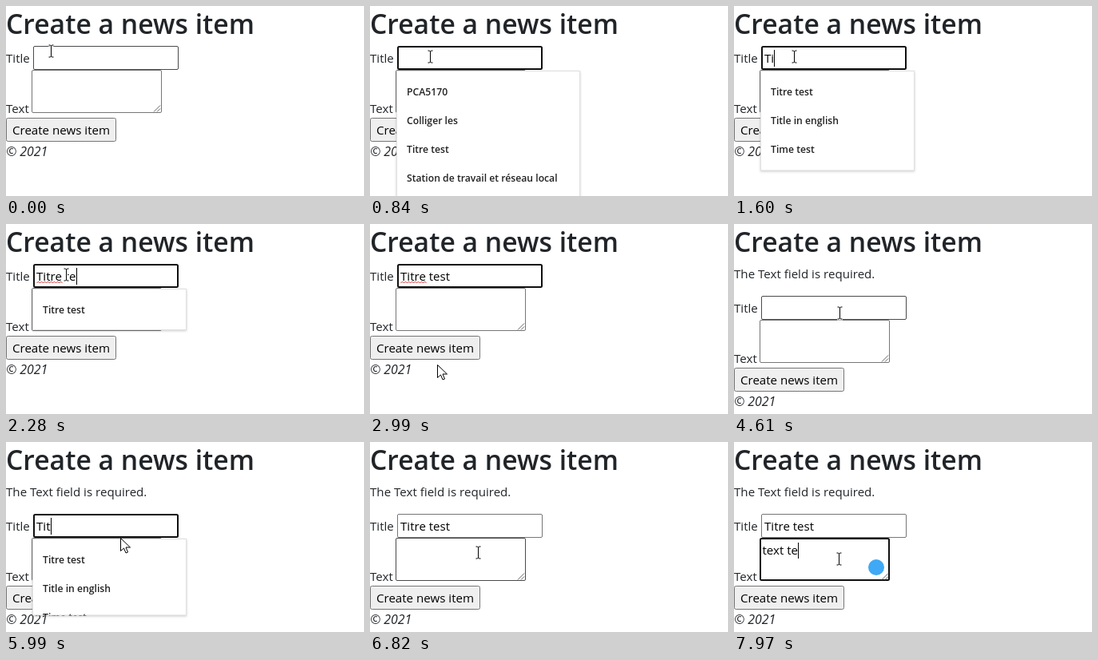
An HTML page for the animation above (8 s loop, 448 px wide and 238 px high).

```html
<!DOCTYPE html>
<html lang="en">
<head>
<meta charset="utf-8">
<title>Create a news item</title>
<style>
  html, body { margin: 0; width: 100%; height: 100%; overflow: hidden; background: #fff; }
  #stage { display: block; width: 448px; height: 238px; }
  text { font: 15.12px "Open Sans", "Noto Sans", sans-serif; fill: #212529; white-space: pre; }
  .heading { font-size: 33.7px; font-weight: 600; }
  .control { fill: #000; }
  .footer { font-size: 15.9px; font-style: italic; }
  #rows text { font-size: 12.2px; font-weight: 600; fill: #222; }
  #panel { fill: #fff; stroke: #e0e0e0; filter: drop-shadow(0 1px 1.5px rgba(0, 0, 0, .2)); }
  .box { fill: #fff; stroke: #767676; }
  .box.hover { stroke: #4a4a4a; }
  .box.focus { stroke: #101010; stroke-width: 2px; }
  #button { fill: #efefef; }
  #button.hover { fill: #e5e5e5; }
  .caret { fill: #000; }
  .line { fill: none; stroke: #000; }
  .halo { fill: none; stroke: #fff; stroke-width: 3px; }
  .shape { fill: #fff; stroke: #000; stroke-linejoin: round; }
  #grip { stroke: #606060; }
  #squiggle { stroke: #e03030; }
</style>
</head>
<body>
<svg id="stage" viewBox="0 0 448 238">
  <text class="heading" x="0" y="35">Create a news item</text>
  <text id="error" x="0" y="68">The Text field is required.</text>
  <g id="form">
    <text x="0" y="71">Title</text>
    <text x="0" y="134">Text</text>
    <rect id="area" class="box" rx="1.5"/>
    <path id="grip" class="line" d="M185 132.5L193 124.5M189 132.5L193 128.5"/>
    <text id="areaText" class="control" x="35.5" y="101"></text>
    <rect id="areaCaret" class="caret" y="86" width="1" height="20"/>
    <circle id="badge" cx="178" cy="117" r="10" fill="#3fa9f5"/>
    <rect id="button" class="box" rx="2"/>
    <text class="control" x="8" y="161">Create news item</text>
    <text class="footer" x="0" y="188">© 2021</text>
    <rect id="title" class="box" rx="1.5"/>
    <text id="titleText" class="control" x="38" y="71"></text>
    <path id="squiggle" class="line"/>
    <rect id="titleCaret" class="caret" y="55" width="1" height="21"/>
    <g id="popup">
      <rect id="panel" x="33.5" y="81.5"/>
      <svg id="rows" x="33" y="81" width="230" overflow="hidden"></svg>
    </g>
  </g>
  <g id="mouse">
    <g id="beam">
      <path class="halo" d="M-3.5 -7.5H3.5M0 -7.5V7.5M-3.5 7.5H3.5"/>
      <path class="line" d="M-3 -7.5H-1L0 -6.5L1 -7.5H3M0 -6.5V6.5M-3 7.5H-1L0 6.5L1 7.5H3"/>
    </g>
    <path id="arrow" class="shape" d="M0 0V16L4 12.5L6.5 18.5L9 17.5L6.5 11.5H12Z"/>
    <g id="hand">
      <path class="shape" d="M-2 1.5Q0 -1 2 1.5V7Q4 5.5 5.5 7.5Q7.5 6.5 8.5 8.5Q11 8 11 11V15Q11 18 9 20V22.5H-.5V20.5L-6 13.5Q-7 11 -4.5 11L-2 13Z"/>
      <path class="line" d="M2 7V11M5.5 8V11M8.5 9V11.5"/>
    </g>
  </g>
</svg>
<script>
const LOOP = 8000, SUBMIT = 3750, BLINK = 530, FADE = 70, SHRINK = 60;
const ROW = 36, PADDING = 16;
const SVG = 'http://www.w3.org/2000/svg';
const $ = id => document.getElementById(id);

const recent = ['PCA5170', 'Colliger les', 'Titre test', 'Station de travail et réseau local'];
const matches = ['Titre test', 'Title in english', 'Time test', 'Test'];

const boxes = {
  title: { x: 34, y: 50, w: 182, h: 30, cursor: 'beam' },
  area: { x: 32, y: 80, w: 163, h: 54, cursor: 'beam' },
  button: { x: 0, y: 140, w: 138, h: 30, cursor: 'hand' }
};

// Each entry starts with three slow gaps, then runs at the fast pace.
const firstTry = { word: 'Titre test', focus: 310, blur: 3350, start: 1310, slow: 243, fast: 52 };
const secondTry = { word: 'Titre test', focus: 4890, blur: 6690, start: 5600, slow: 180, fast: 66 };
const areaEntry = { word: 'text te', focus: 6860, blur: LOOP, start: 7480, slow: 80, fast: 80 };

const home = { x: 56, y: 56 };
const moves = [
  { start: 20, end: 200, x: 75, y: 63 },
  { start: 2750, end: 3380, x: 102, y: 148, dip: 100 },
  { start: 4400, end: 4610, x: 132, y: 111 },
  { start: 4900, end: 5010, x: 143, y: 120 },
  { start: 6690, end: 6900, x: 131, y: 146 }
];

const progress = (t, start, length) => Math.min(1, Math.max(0, (t - start) / length));
const easeOut = k => 1 - (1 - k) ** 2;
const easeInOut = k => k * k * (3 - 2 * k);
const show = (id, visible) => { $(id).style.display = visible ? '' : 'none'; };
const setAttrs = (el, attrs) => Object.entries(attrs).forEach(([k, v]) => el.setAttribute(k, v));

function mouseAt(t) {
  let { x, y } = home;
  for (const move of moves) {
    const k = easeInOut(progress(t, move.start, move.end - move.start));
    x += (move.x - x) * k;
    y += (move.y - y) * k + (move.dip || 0) * Math.sin(Math.PI * k);
  }
  return { x: Math.round(x), y: Math.round(y) };
}

function entryAt(entry, t) {
  const { word, focus, blur, start, slow, fast } = entry;
  const keyTime = i => start + Math.min(i, 3) * slow + Math.max(i - 3, 0) * fast;
  const count = [...word].filter((_, i) => keyTime(i) <= t).length;
  const since = count ? keyTime(count - 1) : focus;
  return {
    word, since, focus,
    text: word.slice(0, count),
    focused: t >= focus && t < blur,
    blink: (t - since) % (2 * BLINK) < BLINK
  };
}

function drawBox(id, focused, hover) {
  const { x, y, w, h } = boxes[id];
  const inset = focused ? 1 : 0.5;
  setAttrs($(id), { x: x + inset, y: y + inset, width: w - 2 * inset, height: h - 2 * inset });
  $(id).classList.toggle('focus', focused);
  $(id).classList.toggle('hover', hover);
}

function drawField(id, { text, focused, blink }) {
  const label = $(id + 'Text');
  if (label.textContent !== text) label.textContent = text;
  show(id + 'Caret', focused && blink);
  const width = text ? label.getComputedTextLength() : 0;
  $(id + 'Caret').setAttribute('x', Math.round(+label.getAttribute('x') + width));
}

function fillRows(list) {
  $('rows').replaceChildren(...list.map((label, i) => {
    const row = document.createElementNS(SVG, 'text');
    setAttrs(row, { x: 13, y: 31 + ROW * i });
    row.textContent = label;
    return row;
  }));
}

const suggest = text => text ? matches.filter(item => item.startsWith(text)) : recent;

let shownRows = '';
function drawPopup(t, { text, word, since, focus, focused }) {
  const open = focused && text !== word;
  show('popup', open);
  if (!open) return false;

  const before = suggest(text.slice(0, -1));
  const after = suggest(text);
  const k = easeOut(progress(t, since, SHRINK));
  const height = PADDING + ROW * (before.length + (after.length - before.length) * k);
  const list = k < 1 && text.length > 1 ? before : after;
  if (list.join() !== shownRows) {
    shownRows = list.join();
    fillRows(list);
  }
  setAttrs($('panel'), { width: text ? 192 : 229, height: height - 1 });
  $('rows').setAttribute('height', height);
  $('popup').style.opacity = progress(t, focus, FADE);
  return true;
}

function draw(t) {
  const failed = t >= SUBMIT;
  const shift = failed ? 40 : 0;
  const title = entryAt(failed ? secondTry : firstTry, t);
  const area = entryAt(areaEntry, t);
  const focus = { title: title.focused, area: area.focused, button: false };

  show('error', failed);
  $('form').setAttribute('transform', `translate(0 ${shift})`);
  drawField('title', title);
  drawField('area', area);
  show('squiggle', title.focused && title.text.includes(' '));
  show('badge', area.text);
  const popupOpen = drawPopup(t, title);

  const mouse = mouseAt(t);
  const formY = mouse.y - shift;
  const covered = popupOpen && formY >= 80;
  let cursor = 'arrow';
  for (const [id, { x, y, w, h, cursor: ownCursor }] of Object.entries(boxes)) {
    const over = !covered && mouse.x >= x && mouse.x < x + w && formY >= y && formY < y + h;
    if (over) cursor = ownCursor;
    drawBox(id, focus[id], over);
  }
  $('mouse').setAttribute('transform', `translate(${mouse.x + .5} ${mouse.y + .5})`);
  for (const id of ['beam', 'arrow', 'hand']) show(id, id === cursor);
}

$('squiggle').setAttribute('d', 'M38.5 74' + 'l2 -2l2 2'.repeat(8));

const start = performance.now();
function frame() {
  draw((performance.now() - start) % LOOP);
  requestAnimationFrame(frame);
}
frame();
</script>
</body>
</html>
```
